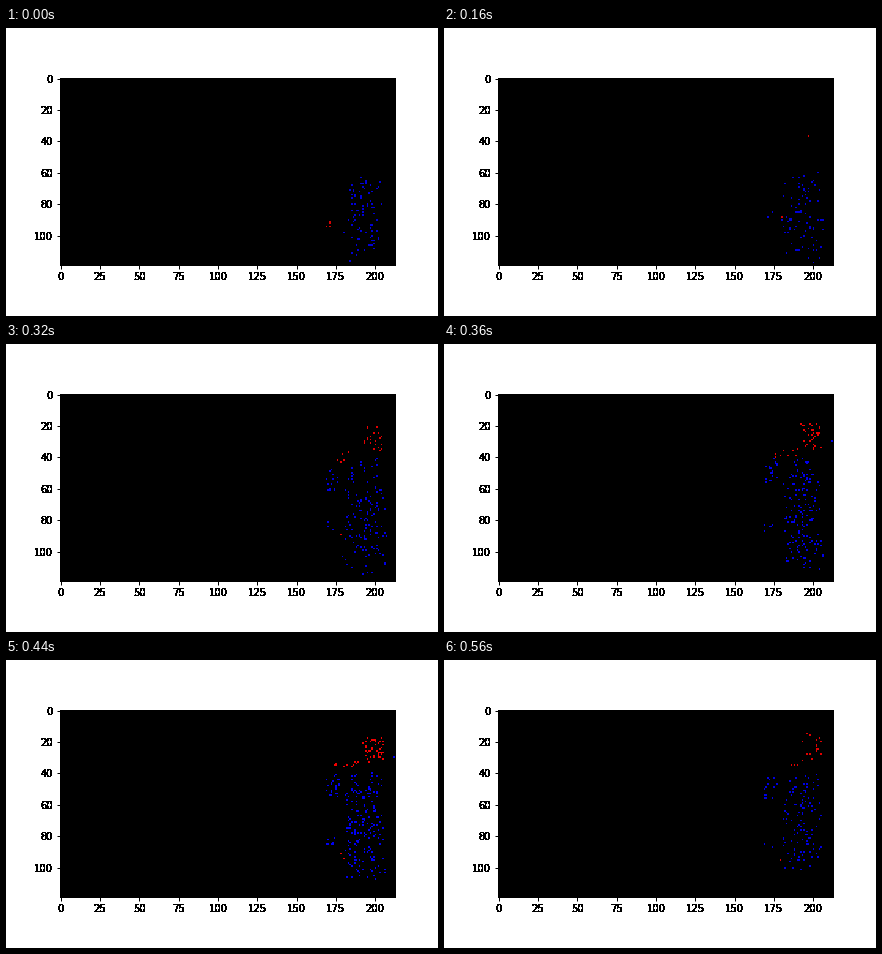
A matplotlib script for the animation above (600 ms loop, 432 by 288 pixels).

```python
import numpy as np
import matplotlib.pyplot as plt
from matplotlib.animation import FuncAnimation

WIDTH, HEIGHT = 213, 119
FRAMES, STEP = 15, 40

plt.rcParams["font.family"] = "DejaVu Sans"
plt.rcParams["font.size"] = 10
plt.rcParams["axes.linewidth"] = 1


def ease(t):
    t = np.clip(t, 0, 1)
    return t * t * (3 - 2 * t)


def blend(a, b, t):
    return a + (b - a) * t


def scatter(image, rng, color, center, size, count, focus=1.0, taper=0.0):
    """Sprinkle single-pixel events in a box, narrower at the top by taper."""
    u, v = rng.beta(focus, focus, (2, int(round(count)))) - 0.5
    u *= 1 - taper * (0.5 - v)
    x = np.clip(center[0] + u * size[0], 0, WIDTH - 1).astype(int)
    y = np.clip(center[1] + v * size[1], 0, HEIGHT - 1).astype(int)
    image[y, x] = color


def events(i):
    """One frame of sensor events: a figure stands up and lifts its arms."""
    rng = np.random.default_rng(40 + i)
    image = np.zeros((HEIGHT, WIDTH, 3), np.uint8)

    activity = np.exp(-((i - 10.7) / 3.2) ** 2)
    level = int(215 + 30 * activity)
    red, blue = (level, 0, 0), (0, 0, level)

    # Torso and legs
    top = blend(62, 39, ease((i - 2) / 7))
    bottom = blend(118, 104, ease((i - 6) / 8))
    scatter(image, rng, blue, (193.5, (top + bottom) / 2), (30, bottom - top),
            82 + 95 * activity, focus=1.5, taper=0.25)

    # Raised arm and lower edge
    lift = ease((i - 5) / 4)
    arm_count = (7 + 17 * activity) * ease((i - 3) / 3)
    scatter(image, rng, blue, (173.5, blend(87, 49, lift)),
            (blend(5, 9, lift), blend(4, 16, lift)), arm_count)
    scatter(image, rng, blue, (172, 84), (6, 8), 7 * activity)
    scatter(image, rng, blue, (WIDTH - 0.5, 30.5), (0.5, 0.5), activity)

    # Head and shoulder
    head_y = blend(38, 25, ease((i - 5) / 5))
    scatter(image, rng, red, (199.5, head_y), (15, 19), 46 * activity, focus=1.6)
    scatter(image, rng, red, (182, head_y + 11), (18, 6), 10 * activity)

    # Hand swings in, then settles by the hip
    hand = (np.interp(i, [0, 6, 8], [170.5, 187, 179]),
            np.interp(i, [0, 6, 12], [93.5, 87, 94]))
    scatter(image, rng, red, hand, (4, 4), 2 + 2 * np.cos(np.pi * i / 3))
    return image


def harden(img, dpi):
    """Give text solid edges instead of antialiased ones."""
    img[..., 3] = img[..., 3] > 0.05
    return img, 0, 0


fig = plt.figure(figsize=(6, 4), dpi=72, facecolor="white")
ax = fig.add_axes([0.125, 0.125, 0.775, 0.755])
picture = ax.imshow(events(0), interpolation="nearest")
ax.set_xticks(range(0, 201, 25))
ax.set_yticks(range(0, 101, 20))
ax.tick_params(width=1)
for label in ax.get_xticklabels() + ax.get_yticklabels():
    label.set_agg_filter(harden)


def update(i):
    picture.set_data(events(i))
    return [picture]


anim = FuncAnimation(fig, update, frames=FRAMES, interval=STEP,
                     repeat=True, repeat_delay=0, blit=False)
plt.show()
```
